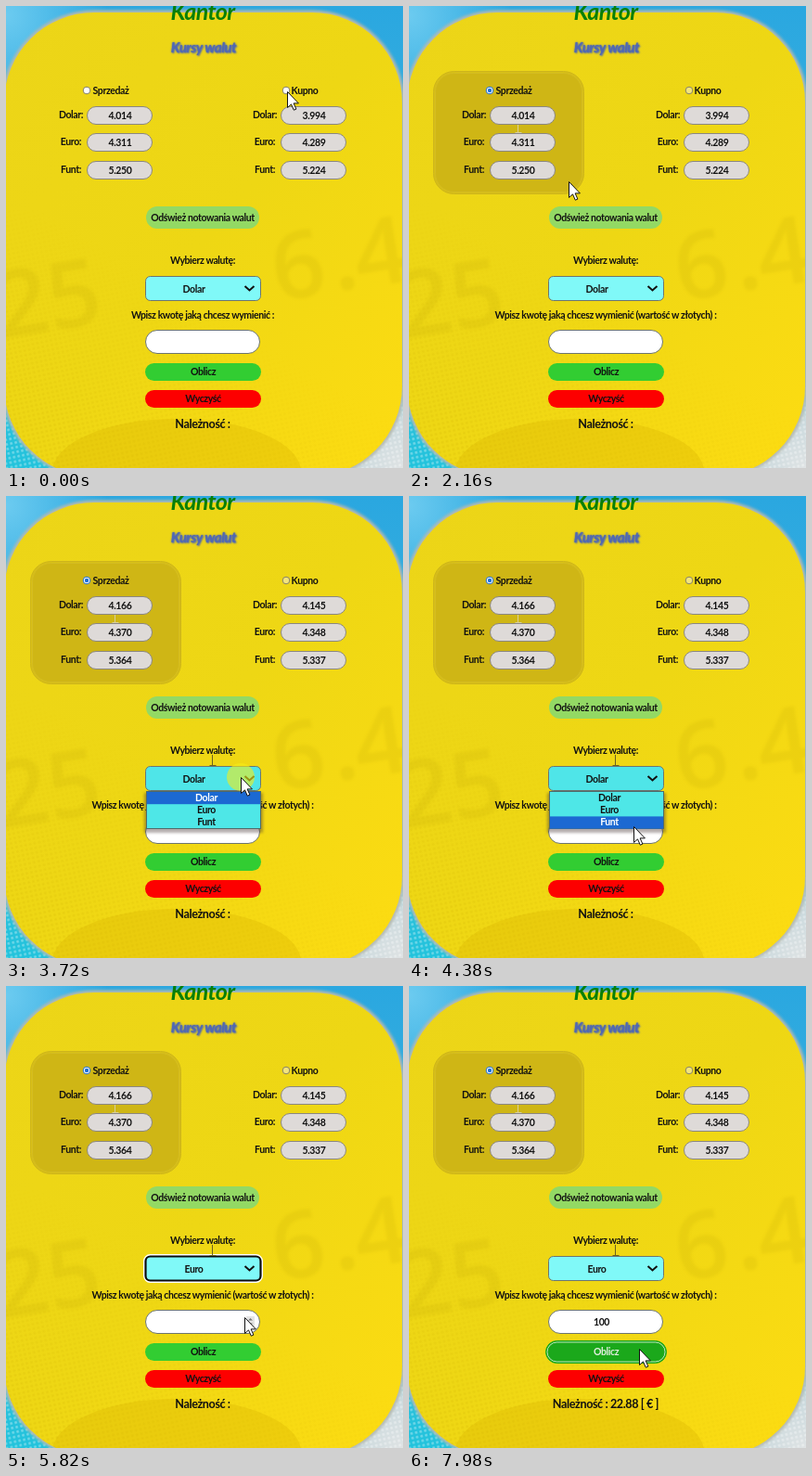
Animation of 428x498 px, one loop 8000 ms. Source, as an HTML page:

```html
<!DOCTYPE html>
<html lang="pl">
<head>
<meta charset="utf-8">
<title>Kantor</title>
<style>
  html, body { margin: 0; width: 100%; height: 100%; overflow: hidden; background: #eed714; }
  svg { display: block; width: 428px; height: 498px; }
  text { font: 700 10.5px Lato, "Open Sans", sans-serif; letter-spacing: -.4px; text-anchor: middle; fill: #111; }
  .title { font-size: 25px; font-style: italic; letter-spacing: -.6px; fill: #087f08; }
  .sub { font-size: 15px; font-style: italic; fill: #5068b4; text-shadow: 1px 1px 2px #4560b8, 0 0 2px #4560b8; }
  .due { font-size: 12.6px; }
  .mark text { font: 600 100px "Open Sans", sans-serif; fill: #b99a00; opacity: .14; }
  .pill { fill: #dedad8; stroke: #8b8780; }
  .ring { fill: none; stroke: #fff; }
</style>
</head>
<body>
<svg viewBox="0 0 428 498">
  <defs>
    <linearGradient id="sky" x2="0" y2="1">
      <stop offset="0" stop-color="#2aa7e0"/><stop offset=".5" stop-color="#3fb4dc"/><stop offset="1" stop-color="#22c3dc"/>
    </linearGradient>
    <radialGradient id="glow" gradientUnits="userSpaceOnUse" cx="0" cy="10" r="110">
      <stop offset="0" stop-color="#6ccbf0"/><stop offset="1" stop-color="#6ccbf0" stop-opacity="0"/>
    </radialGradient>
    <radialGradient id="pale" gradientUnits="userSpaceOnUse" cx="428" cy="498" r="110">
      <stop offset="0" stop-color="#dfe3e4"/><stop offset=".5" stop-color="#c9d9dd"/><stop offset="1" stop-color="#c9d9dd" stop-opacity="0"/>
    </radialGradient>
    <linearGradient id="gold" x2="1" y2="1">
      <stop offset="0" stop-color="#ecd518"/><stop offset=".5" stop-color="#eed714"/><stop offset="1" stop-color="#fddc12"/>
    </linearGradient>
    <linearGradient id="fade" x1="0" y1="1" x2=".55" y2=".4">
      <stop offset="0" stop-color="#fff"/><stop offset="1" stop-color="#000"/>
    </linearGradient>
    <pattern id="dots" width="5" height="5" patternUnits="userSpaceOnUse" patternTransform="rotate(-12)">
      <circle cx="2.5" cy="2.5" r="1.4" fill="#fff"/>
    </pattern>
    <pattern id="grain" width="5" height="5" patternUnits="userSpaceOnUse" patternTransform="rotate(-12)">
      <circle cx="2.5" cy="2.5" r="1.3" fill="#c9a800"/>
    </pattern>
    <mask id="corner"><rect y="220" width="428" height="278" fill="url(#fade)"/></mask>
    <clipPath id="inside"><rect x="-2" y="7" width="429" height="500" rx="97"/></clipPath>
    <filter id="soft" x="-20%" y="-20%" width="140%" height="140%"><feGaussianBlur stdDeviation="1.6"/></filter>
  </defs>

  <rect width="428" height="498" fill="url(#sky)"/>
  <rect width="110" height="120" fill="url(#glow)"/>
  <rect x="318" y="388" width="110" height="110" fill="url(#pale)"/>
  <rect y="400" width="428" height="98" fill="url(#dots)" opacity=".35"/>
  <rect x="-2" y="7" width="429" height="500" rx="97" fill="none" stroke="#b4b9b0" stroke-width="5" filter="url(#soft)"/>
  <rect x="-2" y="7" width="429" height="500" rx="97" fill="url(#gold)"/>
  <g clip-path="url(#inside)">
    <rect y="220" width="428" height="278" fill="url(#grain)" opacity=".24" mask="url(#corner)"/>
    <ellipse cx="184" cy="502" rx="134" ry="57" fill="#d9b400" opacity=".34"/>
    <g class="mark" filter="url(#soft)">
      <text transform="translate(50 350) rotate(-9)">25</text>
      <text transform="translate(320 314) rotate(-9)">6</text>
      <text transform="translate(369 305) rotate(-9)">.</text>
      <text transform="translate(409 300) rotate(-9)">4</text>
    </g>
  </g>
  <g id="ui"></g>
</svg>
<script>
const ui = document.getElementById('ui');
const add = (tag, attrs, parent = ui) => {
  const el = document.createElementNS('http://www.w3.org/2000/svg', tag);
  for (const k in attrs) el.setAttribute(k, attrs[k]);
  return parent.appendChild(el);
};
const group = (parent = ui) => add('g', {}, parent);
const box = (x, y, w, h, rx, attrs, parent) => add('rect', { x, y, width: w, height: h, rx, ...attrs }, parent);
const label = (x, y, str, cls = '', parent = ui) => {
  const el = add('text', { x, y, class: cls }, parent);
  el.textContent = str;
  return el;
};
const show = (el, on) => el.setAttribute('visibility', on ? 'visible' : 'hidden');
const within = (t, a, b) => t >= a && t < b;
const ramp = (t, a, b) => Math.min(1, Math.max(0, (t - a) / (b - a)));

// Rates before and after the refresh
const ROWS = ['Dolar', 'Euro', 'Funt'];
const RATES = [
  [['4.014', '4.311', '5.250'], ['4.166', '4.370', '5.364']],
  [['3.994', '4.289', '5.224'], ['4.145', '4.348', '5.337']]
];
const ASK = 'Wpisz kwotę jaką chcesz wymienić';

label(212, 15, 'Kantor', 'title');
label(213, 50, 'Kursy walut', 'sub');

const sides = ['Sprzedaż', 'Kupno'].map((name, i) => {
  const dx = i * 209;
  const panel = group();
  box(26.5 + dx, 70.5, 162, 132, 22, { fill: '#d8bf16', stroke: '#cdb51c' }, panel);
  box(28.5 + dx, 72.5, 158, 128, 20, { fill: '#cfb615', stroke: '#d4bc22' }, panel);
  const cx = i ? 302 : 87;
  const ring = add('circle', { cx, cy: 91, r: 3.8 });
  const dot = add('circle', { cx, cy: 91, r: 2.2, fill: '#1c6fd8' });
  label(i ? 322 : 113, 95, name);
  const values = ROWS.map((row, j) => {
    const y = [118, 147, 177][j];
    label(70 + dx, y + 3.3, row + ':');
    box(87.5 + dx, y - 9.5, 70, 19, 9.5, { class: 'pill' });
    return label(123 + dx, y + 3.5, '');
  });
  return { panel, ring, dot, values };
});

const button = (x, y, w, h, name, fill, hoverFill) => {
  const ring = group();
  box(x - 2.5, y - 2.5, w + 5, h + 5, h / 2 + 2.5, { fill: hoverFill, stroke: hoverFill }, ring);
  box(x - 1, y - 1, w + 2, h + 2, h / 2 + 1, { class: 'ring', opacity: .7 }, ring);
  const face = box(x, y, w, h, h / 2, {});
  const text = label(x + w / 2, y + h / 2 + 3.6, name);
  return on => {
    show(ring, on);
    face.setAttribute('fill', on ? hoverFill : fill);
    text.style.fill = on ? '#e4eee0' : '#111';
  };
};
const refresh = button(151, 216, 122, 24, 'Odśwież notowania walut', '#93d964', '#4fb53a');

label(212, 278.3, 'Wybierz walutę:');
const prompt = label(212, 337, '');

const field = (y, h, rx, x = 150.5, w = 124) => {
  const glow = box(x - 1.5, y - 1.5, w + 3, h + 3, rx + 1.5, { class: 'ring', 'stroke-width': 2 });
  const face = box(x, y, w, h, rx, {});
  return (fill, focus) => {
    show(glow, focus);
    face.setAttribute('fill', fill);
    face.setAttribute('stroke', focus ? '#0c0c0c' : '#6d7570');
    face.setAttribute('stroke-width', focus ? 2.2 : 1);
  };
};
const select = field(291.5, 26, 5);
const chosen = label(202.5, 308.5, '');
add('path', { d: 'M257.5 302l5 4.5 5-4.5', fill: 'none', stroke: '#111', 'stroke-width': 2 });

const input = field(349.5, 25, 12.5, 150.5, 123);
const typed = label(207.5, 365.8, '');
const caret = box(0, 357, 1, 11, 0, { fill: '#111' });
const spin = group();
box(259, 356, 9, 12, 0, { fill: '#e4e4e4' }, spin);
add('path', { d: 'M261 360.5l2.5-2.5 2.5 2.5zM261 363.5l2.5 2.5 2.5-2.5z', fill: '#777' }, spin);

const count = button(150, 385, 125, 19, 'Oblicz', '#32cd32', '#1ba81b');
button(150, 414, 125, 19, 'Wyczyść', '#fd0000', '#c00000')(false);
const due = label(212, 455, '', 'due');

// Traces left on the page by the text cursor
const traceA = add('path', { d: 'M117.5 128v8m-3 .5h7', stroke: '#d9cf9a', fill: 'none' });
const traceB = add('path', { d: 'M222.5 279v11m-3 .5h7', stroke: '#6a6220', fill: 'none' });

const menu = group();
box(149, 320, 128, 43, 0, { fill: '#433', opacity: .4, filter: 'url(#soft)' }, menu);
box(151.5, 318.5, 123, 40, 0, { fill: '#4ee7e7', stroke: '#4f6a6a' }, menu);
const options = ROWS.map((name, i) => {
  const bar = box(152, 319 + i * 13.2, 122, 13.2, 0, { fill: '#1c69d2' }, menu);
  return { bar, text: label(216, 329 + i * 13.2, name, '', menu) };
});

const halo = add('circle', { r: 15, fill: '#f5ec18', opacity: .6 });
const arrow = add('path', {
  d: 'M.5 .5v17l4-3.6 2.8 6.3 2.6-1.1-2.8-6.2h5.3z', fill: '#fff', stroke: '#111', 'stroke-width': 1
});
const beam = add('path', { d: 'M-3-7.5h2.5l.5.5.5-.5H3M0-7V7M-3 7.5h2.5l.5-.5.5.5H3', fill: 'none', stroke: '#222' });

// Pointer path: time, x, y
const PATH = [
  [0, 303, 92], [600, 303, 92], [780, 210, 90], [960, 130, 90], [1200, 85, 91], [1920, 85, 91],
  [2040, 117, 132], [2160, 172, 189], [2460, 213, 233], [2940, 213, 233], [3240, 222, 284],
  [3600, 253, 303], [3780, 253, 303], [4140, 247, 343], [4380, 242, 356], [4620, 235, 335],
  [5160, 235, 335], [5820, 257, 357], [7080, 257, 357], [7440, 248, 389], [7920, 248, 389], [7980, 248, 391]
];
const CLICKS = [[120, 180], [1500, 1560], [2640, 2700], [3720, 3840], [4920, 4980], [6000, 6060], [7740, 7800]];
const BEAMS = [[2040, 2100], [3180, 3300], [4980, 5580]];
const during = (list, t) => list.some(([a, b]) => within(t, a, b));

function pointer(t) {
  const i = PATH.findIndex(p => p[0] > t);
  if (i < 0) return PATH[PATH.length - 1].slice(1);
  const [t0, x0, y0] = PATH[i - 1], [t1, x1, y1] = PATH[i];
  const k = (t - t0) / (t1 - t0);
  return [x0 + (x1 - x0) * k, y0 + (y1 - y0) * k];
}

function draw(t) {
  const [x, y] = pointer(t);
  const at = `translate(${Math.round(x)} ${Math.round(y)})`;

  const alpha = [ramp(t, 1500, 1800), ramp(t, 120, 480) * (1 - ramp(t, 1500, 1800))];
  const pick = t < 180 ? -1 : t < 1560 ? 1 : 0;
  sides.forEach((s, i) => {
    const on = pick === i;
    s.panel.setAttribute('opacity', alpha[i]);
    s.ring.setAttribute('stroke', on ? '#1c6fd8' : '#85816a');
    s.ring.setAttribute('fill', i && t >= 1800 ? '#f3e57c' : '#fff');
    show(s.dot, on);
    s.values.forEach((v, j) => { v.textContent = RATES[i][t < 2820 ? 0 : 1][j]; });
  });
  prompt.textContent = ASK + ['', ' (wartość w złotych)', ' (wartość w dolarach)'][pick + 1] + ' :';

  refresh(within(y, 216, 240) && x > 151 && t > 2000);
  count(y >= 385);

  const open = within(t, 3720, 4980);
  const hover = Math.min(2, Math.max(0, Math.floor((y - 319) / 13.2)));
  show(menu, open);
  options.forEach(({ bar, text }, i) => {
    show(bar, open && i === hover);
    text.style.fill = i === hover ? '#fff' : '#111';
  });
  select(open ? '#4fe5e8' : '#80f9f8', within(t, 4980, 6000));
  chosen.textContent = ROWS[t < 4980 ? 0 : 1];

  const n = t < 6660 ? 0 : t < 6780 ? 1 : t < 6900 ? 2 : 3;
  typed.textContent = '100'.slice(0, n);
  input('#fff', within(t, 6000, 7740));
  caret.setAttribute('x', 209 + (n ? n * 2.8 - 1.4 : 0));
  show(caret, within(t, 6000, 6480) || within(t, 6660, 7380));
  show(spin, within(y, 350, 375) && t > 5500);
  due.textContent = 'Należność :' + (t < 7740 ? '' : ' 22.88 [ € ]');

  show(traceA, t >= 2100);
  show(traceB, t >= 3300);
  const text = during(BEAMS, t);
  show(halo, during(CLICKS, t));
  show(beam, text);
  show(arrow, !text);
  [halo, beam, arrow].forEach(el => el.setAttribute('transform', at));
}

const start = performance.now();
function tick(now) {
  const t = Math.max(0, now - start) % 8000;
  draw(Math.floor(t / 60) * 60);
  requestAnimationFrame(tick);
}
draw(0);
requestAnimationFrame(tick);
</script>
</body>
</html>
```
